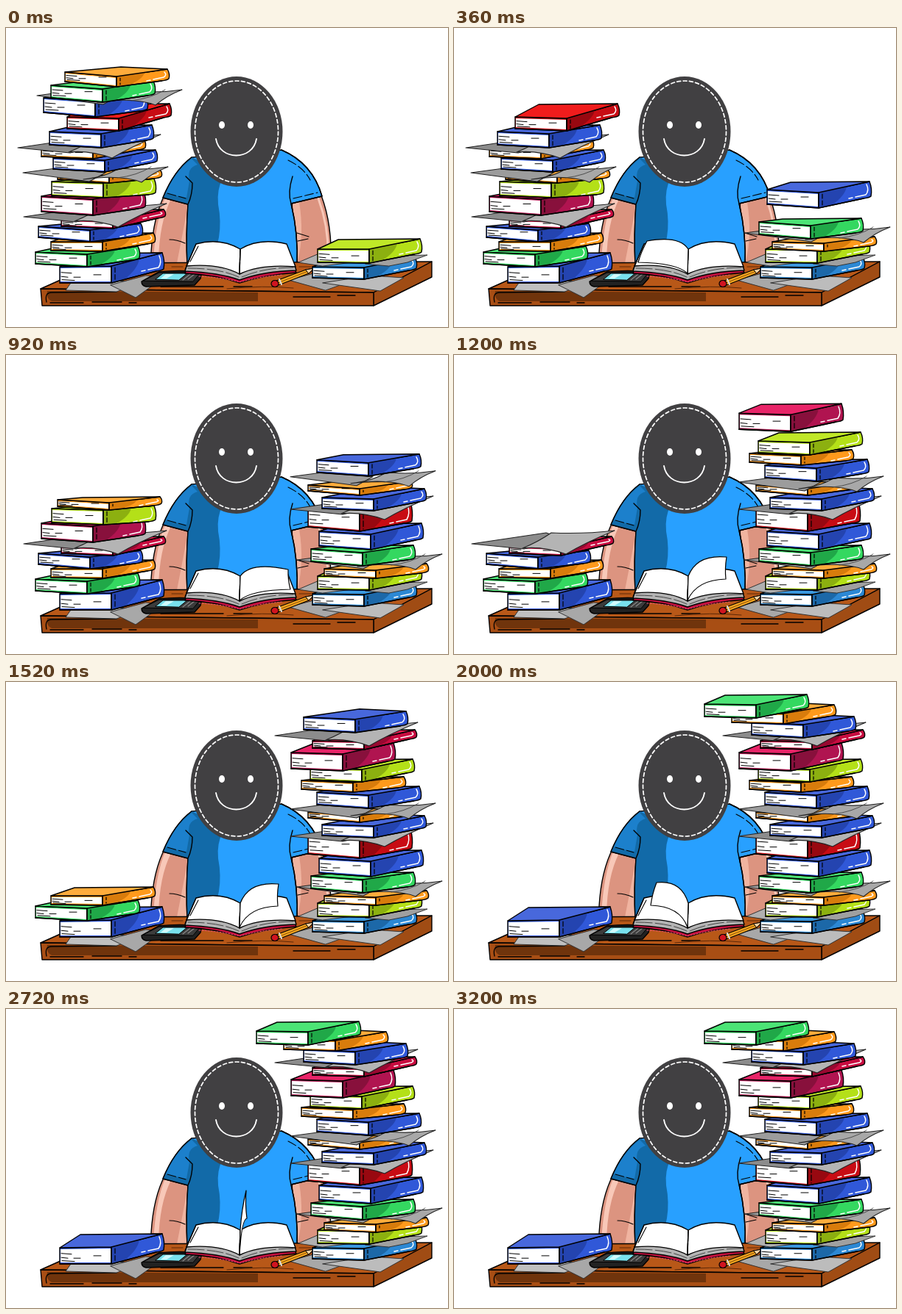
These frames come from a looping animation (600 by 407 pixels, 3280 ms). An HTML page with a canvas:

```html
<!DOCTYPE html>
<html lang="en">
<head>
<meta charset="utf-8">
<title>Studying at a desk</title>
<style>
  html, body { margin: 0; width: 100%; height: 100%; overflow: hidden; background: #fff; }
  canvas { display: block; width: 600px; height: 407px; }
</style>
</head>
<body>
<canvas id="stage" width="600" height="407"></canvas>
<script>
const g = document.getElementById('stage').getContext('2d');
const LOOP = 3280, STEP = 40;

// top, spine, spine shadow
const INK = {
  blue: ['#4868dc', '#3058d8', '#2444b0'],
  sky: ['#3a98e0', '#2c88d4', '#1c68a8'],
  green: ['#4ce476', '#34d860', '#20a848'],
  orange: ['#ffac3c', '#ff9a1c', '#d87c0c'],
  lime: ['#c0e828', '#b4e018', '#8cb010'],
  red: ['#f01c1c', '#c80c14', '#980810'],
  pink: ['#e82468', '#b01450', '#88103c'],
  crimson: ['#e81c50', '#c80c40', '#980830']
};

// x, y of the front corner, corner drop, rise to the back, height, back offset, colour
const left = [
  [80, 60, 6, 4, 13, 76, 'orange'],
  [61, 78, 5, 6, 17, 40, 'green'],
  [51, 95, 5, 5, 20, 34, 'blue'],
  [83, 121, 2, 18, 16, 32, 'red'],
  [59, 141, 3, 9, 18, 34, 'blue'],
  [48, 163, 2, 12, 12, 36, 'orange'],
  [64, 177, 3, 11, 15, 34, 'blue'],
  [70, 197, 4, 4, 9, 34, 'orange'],
  [62, 209, 2, 4, 19, 32, 'lime'],
  [48, 229, 4, 7, 21, 32, 'pink'],
  [75, 261, 2, 14, 9, 30, 'crimson'],
  [44, 270, 5, 4, 15, 32, 'blue'],
  [61, 291, 0, 12, 12, 32, 'orange'],
  [40, 305, 3, 8, 16, 32, 'green'],
  [73, 325, -1, 19, 22, 28, 'blue']
];
const right = [
  [432, 291, 2, 7, 10, 34, 'orange'],
  [414, 264, 5, 5, 17, 32, 'green'],
  [425, 240, 4, 11, 20, 32, 'blue'],
  [410, 208, 5, 8, 26, 70, 'red'],
  [429, 194, 2, 12, 15, 76, 'blue'],
  [410, 177, 5, 5, 8, 34, 'orange'],
  [422, 150, 4, 8, 17, 36, 'blue'],
  [401, 134, 3, 5, 12, 34, 'orange'],
  [413, 117, 2, 12, 16, 28, 'lime'],
  [387, 96, 2, 13, 22, 30, 'pink'],
  [416, 80, 1, 15, 10, 30, 'crimson'],
  [404, 55, 3, 8, 17, 76, 'blue'],
  [377, 42, 1, 11, 13, 76, 'orange'],
  [340, 30, 1, 13, 17, 28, 'green']
];
const starts = [120, 240, 360, 520, 640, 720, 840, 960, 1080, 1160, 1320, 1440, 1560, 1680];

// loose sheets by index of the book they travel with: left x, y, right x, y, flat
const sheets = {
  1: [42, 92, 395, 279, false],
  4: [16, 163, 386, 210, true],
  6: [23, 197, 386, 173, false],
  10: [24, 257, 365, 73, true]
};

// turning page: tip x, y, lower corner x, y, bend y
const leaf = [
  null,
  [262, 290, 250, 319, 282],
  [275, 273, 267, 304, 269],
  [300, 254, 297, 293, 256],
  [326, 247, 327, 285, 273],
  [354, 256, 352, 296, 256],
  [370, 275, 369, 305, 271],
  [383, 292, 386, 319, 281]
];

function path(d, fill, stroke = '#000', width = 1.4, dash = []) {
  const p = new Path2D(d);
  if (fill) { g.fillStyle = fill; g.fill(p); }
  if (stroke) {
    g.strokeStyle = stroke;
    g.lineWidth = width;
    g.setLineDash(dash);
    g.stroke(p);
  }
}

function oval(x, y, rx, ry, fill, stroke, width, dash = []) {
  g.beginPath();
  g.ellipse(x, y, rx, ry, 0, 0, 7);
  if (fill) { g.fillStyle = fill; g.fill(); }
  if (stroke) {
    g.beginPath();
    g.ellipse(x, y, rx, ry, 0, 0, 2 * Math.PI);
    g.strokeStyle = stroke;
    g.lineWidth = width;
    g.setLineDash(dash);
    g.stroke();
  }
}

function book([x, y, by, rise, h, back, ink], dy = 0) {
  y += dy;
  const [top, side, dark] = INK[ink];
  const bx = x + 70, b = y + by, f = b + h + 1;
  const cx = x + 139, c = y - rise, e = c + h;
  const d = back > 50 ? c - 3 : c + 1;
  path(`M${x} ${y}L${bx} ${b}V${f}L${x} ${y + h}Z`, side);
  path(`M${x + 1} ${y + 2}L${bx - 1} ${b + 2}V${f - 2}L${x + 1} ${y + h - 2}Z`, '#fff', null);
  path(`M${x + 2} ${y + h * .35}l14 1M${x + 2} ${y + h * .6}l9 1m8 0h9M${x + 3} ${y + h * .8}l17 1m26 -${h * .35}h10`, null, '#000', 1);
  path(`M${bx} ${b}L${cx} ${c}Q${cx + 4} ${c + h * .5} ${cx + 2} ${e}Q${cx} ${e + 2} ${cx - 8} ${e + 3}L${bx} ${f}Z`, side);
  path(`M${bx} ${b}L${bx + 38} ${b + (c - b) * .55}Q${bx + 36} ${(b + e) / 2 + 2} ${bx + 18} ${f + (e - f) * .26}L${bx} ${f}Z`, dark, null);
  path(`M${cx - 4} ${c + 4}Q${cx} ${c + h * .6} ${cx - 5} ${e - 2}l-14 3m-4 1l-5 1`, null, '#fff', 1.5);
  path(`M${bx + 5} ${b + 2}V${f - 3}`, null, '#000', 1.2, [h * .3, 3]);
  path(`M${x} ${y}L${x + back} ${d}L${cx} ${c}L${bx} ${b}Z`, top);
  path(`M${bx} ${b}V${f}L${cx - 8} ${e + 3}M${bx} ${f}L${x} ${y + h}`, null, '#000', 1.7);
}

function sheet(x, y, flat) {
  g.save();
  g.translate(x, y);
  if (flat) {
    path('M0 0L101 -15L126 -7L71 7Z', '#8c8c8c', '#222', 1.1);
    path('M69 6Q91 -3 108 -15Q152 -13 194 -18Q155 -2 128 14Q97 3 69 6Z', '#b4b4b4', '#222', 1.1);
  } else {
    path('M0 0L52 -7L112 0L90 12Z', '#9c9c9c', '#222', 1.1);
    path('M82 9Q112 6 130 -6Q165 -3 197 -8Q176 0 161 13Q133 2 82 9Z', '#a8a8a8', '#222', 1.1);
    path('M128 7Q155 4 174 -8', null, '#444', .9);
  }
  g.restore();
}

function person() {
  // arms
  path('M216 226Q200 256 197 305V320H245L248 238Z', '#dc9480');
  path('M216 231Q203 262 200 317H207Q208 265 224 233Z', '#f8c8b8', null);
  path('M232 320Q240 280 247 240L245 320Z', '#f0b4a0', null);
  path('M198 306H212M222 288Q232 288 243 293', null, '#000', 1.2);
  path('M388 236L428 228Q443 268 441 320H395Z', '#dc9480');
  path('M389 240L398 237Q405 280 396 318Z', '#f0b4a0', null);
  path('M424 232Q438 270 437 308', null, '#f8c8b8', 3);
  path('M395 279L411 284M396 290L410 287', null, '#000', 1.2);
  // shirt
  path('M252 176Q228 194 213 231L247 240Q244 280 246 325H395Q397 280 387 239L429 229Q416 184 374 166Z', '#28a0ff');
  path('M252 176Q228 194 213 231L247 240Q244 280 246 325H274Q297 287 288 240Q286 220 294 205L263 181Z', '#126aa8', null);
  path('M252 178Q229 196 217 225L245 231L249 208Q245 190 260 186Z', '#1c80cc', null);
  path('M252 176Q228 194 213 231L247 240Q244 280 246 325M395 325Q397 280 387 239L429 229Q416 184 374 166M247 240Q253 227 253 211L244 202M387 239Q382 224 389 202', null);
  path('M219 225L244 232M390 232L423 224M383 180Q404 190 413 207', null, '#000', 1.1, [12, 4]);
  // head
  oval(313, 141, 62.5, 75, '#414042');
  oval(313, 141, 56.5, 69, null, '#fff', 1.7, [5, 3.4]);
  oval(293, 132, 4, 5, '#fff');
  oval(332, 132, 4, 5, '#fff');
  path('M285 151C290 181 335 181 340 151', null, '#fff', 1.8);
}

function desk() {
  path('M47 355L125 320L578 318L499 360Z', '#b85818');
  path('M499 360L578 318V339L499 378Z', '#a04c14');
  path('M47 355L499 360V378H49Z', '#a84e14');
  path('M56 358L342 360V372H62Q54 368 56 358Z', '#70340c', null);
  path('M55 373Q52 360 62 360L150 359M60 374H105m12 -1h40m10 1h10M210 352H295m14 0h25M390 366H440m10 -2h24', null, '#000', 1.3);
  path('M225 325H240M398 325H414M300 355Q350 350 390 354', null, '#5c2808', 1);
}

function deskItems() {
  // papers below the stacks
  path('M90 344L81 357L150 359L186 345Z', '#c0c0c0', '#333', 1);
  path('M142 350L176 367L215 339L190 337Z', '#a8a8a8', '#333', 1);
  path('M384 343L425 332L470 344L434 357Z', '#a8a8a8', '#333', 1);
  path('M430 347L508 358L540 340L495 337Z', '#bcbcbc', '#333', 1);
  // phone
  path('M184 345L207 332Q235 329 266 332L264 341L256 350L190 352Q184 351 184 345Z', '#222');
  path('M186 344L208 333L264 333L254 345Z', '#3c3c3c', '#000', 1);
  path('M203 342L213 334L246 334L235 343Z', '#78e0ec', '#000', 1);
  path('M210 341L217 335H228L218 341Z', '#d0fafc', null);
  path('M240 343L250 335M247 342L256 335', null, '#888', 1.2);
  // pencil
  path('M367 344L407 329L418 327L411 334L370 350Z', '#f8a820', '#000', 1.2);
  path('M369 347L410 331', null, '#804808', 1);
  path('M407 329L418 327L411 334Z', '#f4d0a0', '#000', 1);
  oval(365, 348, 5, 4.5, '#d01420', '#000', 1.2);
  path('M371 342L374 349', null, '#ddd', 2);
}

function openBook(phase) {
  path('M246 327L243 334Q285 336 317 347Q350 336 394 333L390 325Z', '#c81040');
  path('M262 338Q292 339 317 346Q345 338 376 336', null, '#f05078', 1, [2, 2]);
  path('M247 318L243 331Q290 333 317 343Q350 331 394 330L391 320Z', '#b4b4b4');
  path('M247 327Q290 327 316 339M320 339Q350 326 390 326', null, '#444', 1, [22, 4]);
  path('M258 294Q291 285 318 301L317 335Q290 320 245 324Z', '#fff');
  path('M318 301Q344 285 381 294L393 325Q345 321 317 335Z', '#fff');
  path('M258 294L243 329M261 297L250 318', null, '#000', 1.1);
  path('M318 302L317 334', null, '#000', 1.3, [14, 3]);
  const p = leaf[phase];
  if (!p) return;
  const [tx, ty, bx, by, bend] = p;
  const near = x => 318 + (x - 318) * .22;
  path(`M318 301Q${near(tx)} ${bend} ${tx} ${ty}Q${(tx + bx) / 2 - 2} ${(ty + by) / 2} ${bx} ${by}Q${near(bx)} ${by + 1} 317 334Z`, '#fff', '#000', 1.2);
}

function draw(time) {
  const tick = Math.min(80, Math.floor(time / STEP)), now = tick * STEP;
  g.clearRect(0, 0, 600, 407);
  g.lineJoin = g.lineCap = 'round';
  person();
  desk();
  deskItems();
  openBook(tick % 8);

  for (let i = 14; i >= 0; i--) {
    if (i < 14 && now >= starts[i]) continue;
    const s = sheets[i];
    if (s && i !== 10) sheet(s[0], s[1], s[4]);
    book(left[i]);
    if (i === 10) sheet(s[0], s[1], s[4]);
  }

  book([416, 325, 1, 13, 15, 34, 'sky']);
  path('M397 319L425 307L470 319L430 324Z', '#b0b0b0', '#333', 1);
  path('M488 321L530 310L572 309L545 319L520 324Z', '#a0a0a0', '#333', 1);
  book([423, 301, 0, 14, 18, 28, 'lime']);
  right.forEach((b, i) => {
    if (now < starts[i]) return;
    const fall = Math.min(1, (now - starts[i]) / 100);
    const dy = -(i === 13 ? 5 : 20) * (1 - fall * fall);
    const s = sheets[i];
    if (s && i !== 10) sheet(s[2], s[3] + dy, s[4]);
    book(b, dy);
    if (i === 10) sheet(s[2], s[3] + dy, s[4]);
  });
}

const begin = performance.now();
function run() {
  draw((performance.now() - begin) % LOOP);
  requestAnimationFrame(run);
}
run();
</script>
</body>
</html>
```
